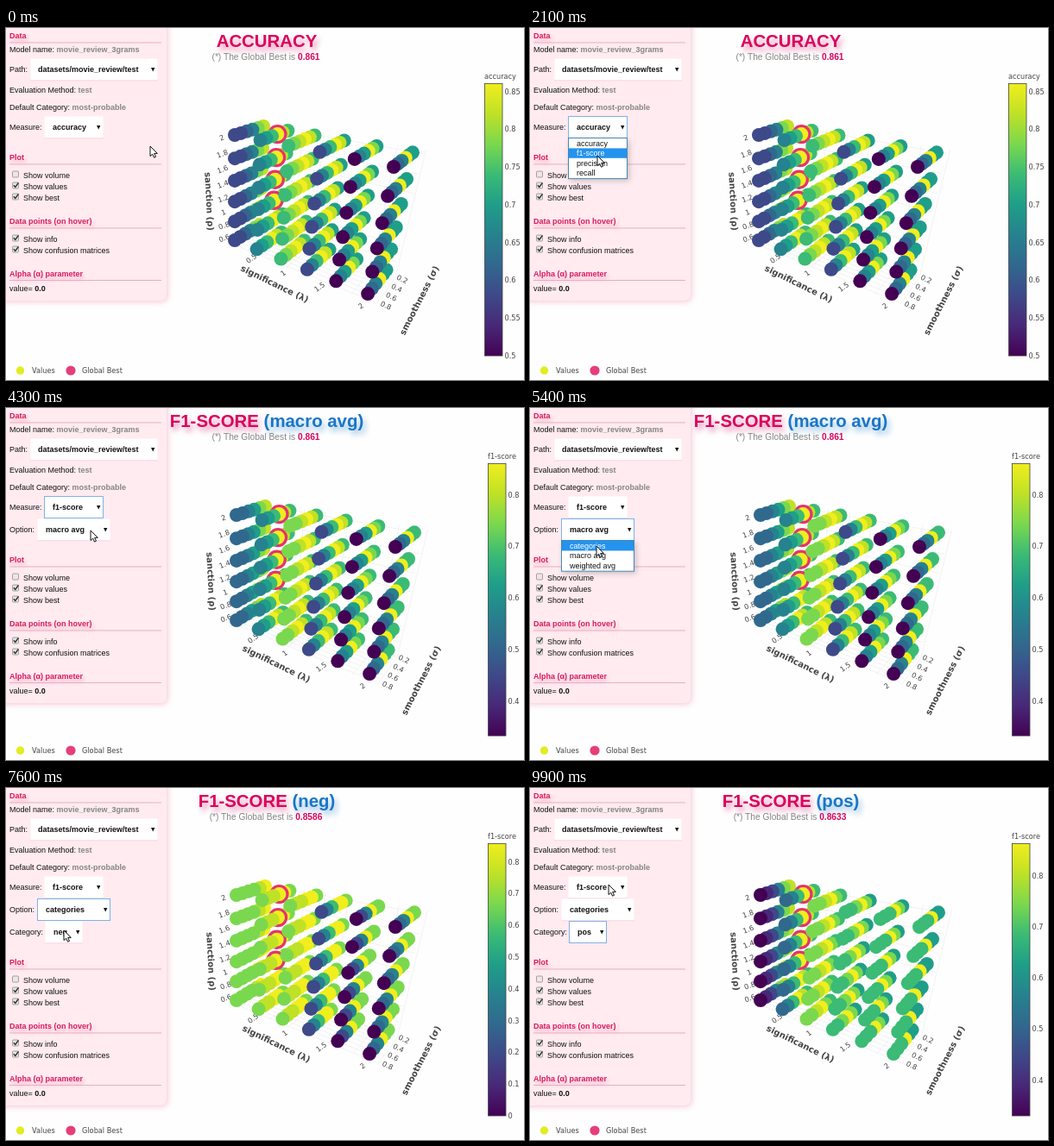
Recreate the animation shown at these times as an HTML page. Size 600x408 px, loop 10000 ms.

```html
<!DOCTYPE html>
<html lang="en">
<head>
<meta charset="utf-8">
<title>Model evaluation plot</title>
<style>
html, body { margin: 0; width: 100%; height: 100%; overflow: hidden; background: #fefefe; }
svg { display: block; }
text { font: 9px "Liberation Sans", Arial, sans-serif; fill: #111; white-space: pre; }
.b { font-weight: bold; }
.gray { fill: #858585; }
.mid { text-anchor: middle; }
.head { font-weight: bold; fill: #d81b60; filter: drop-shadow(2px 4px 2px #f48fb199); }
.title { font-size: 20.4px; font-weight: bold; text-anchor: middle; }
.pink { fill: #d9045c; }
.blue { fill: #1976c8; }
.sub { font-size: 10.2px; text-anchor: middle; }
.plot { font: 8.2px "DejaVu Sans", Verdana, sans-serif; fill: #444; }
.axis { font: bold 10px "DejaVu Sans", Verdana, sans-serif; fill: #444; text-anchor: middle; }
</style>
</head>
<body>
<svg id="stage" width="600" height="408" viewBox="0 0 600 408">
  <defs>
    <linearGradient id="ramp" x1="0" y1="1" x2="0" y2="0"></linearGradient>
    <filter id="soft" x="-20%" y="-60%" width="140%" height="220%"><feGaussianBlur stdDeviation="3"/></filter>
  </defs>
  <g id="plot"></g>
  <g id="panel"></g>
  <g id="heading"></g>
  <g id="menu"></g>
  <path id="cursor" d="M0 0V11.6L2.7 9.2L4.5 13.2L6.5 12.3L4.7 8.4H8.3Z" fill="#fff" stroke="#111" stroke-width="1" stroke-linejoin="round"/>
</svg>
<script>
const LOOP = 10000, STEP = 100;
const VIRIDIS = ['#440154', '#482878', '#3e4989', '#31688e', '#26828e', '#1f9e89', '#3bbb75', '#7ad84e', '#bfe126', '#f0ee1d'];

// Rows: significance; digits: colour level along smoothness, front to back.
const DATA = {
  accuracy: { name: 'accuracy', lo: .5, hi: .861, tick: .05, dx: 0, rows: '223478 456986 678986 246985 045975 034955' },
  macro: { name: 'f1-score', lo: .333, hi: .861, tick: .1, dx: 2, rows: '334578 456986 778986 246986 045976 034966' },
  neg: { name: 'f1-score', lo: 0, hi: .8586, tick: .1, dx: 2, rows: '777789 788997 788997 246997 024977 034977' },
  pos: { name: 'f1-score', lo: .33, hi: .8633, tick: .1, dx: 2, rows: '012478 346986 778976 667975 666975 666955' }
};
const VIEWS = {
  accuracy: { title: 'ACCURACY', best: '0.861', picks: ['accuracy'] },
  macro: { title: 'F1-SCORE', option: '(macro avg)', best: '0.861', picks: ['f1-score', 'macro avg'] },
  neg: { title: 'F1-SCORE', option: '(neg)', best: '0.8586', picks: ['f1-score', 'categories', 'neg'] },
  pos: { title: 'F1-SCORE', option: '(pos)', best: '0.8633', picks: ['f1-score', 'categories', 'pos'] }
};
const FIELDS = [
  { label: 'Measure:', x: 44, w: 69, y: 102, list: ['accuracy', 'f1-score', 'precision', 'recall'] },
  { label: 'Option:', x: 36, w: 85, y: 128, list: ['categories', 'macro avg', 'weighted avg'] },
  { label: 'Category:', x: 45, w: 44, y: 154, list: ['neg', 'pos'] }
];

// Steps: [start time, value]
const VIEW_STEPS = [[0, 'accuracy'], [2300, 'macro'], [5700, 'neg'], [8700, 'pos']];
const PLOT_STEPS = [[0, 'accuracy'], [2600, 'macro'], [6100, 'neg'], [9200, 'pos']];
const FOCUS_STEPS = [[0, -1], [1200, 0], [4600, 1], [7900, 2]];
const MENU_STEPS = [[0, -1], [1200, 0], [2300, -1], [4600, 1], [5700, -1], [7900, 2], [8700, -1]];
const CURSOR = [
  [0, 167, 137], [300, 165, 136], [900, 106, 117], [1300, 102, 117], [1800, 84, 140], [2100, 78, 148],
  [2400, 78, 148], [2800, 95, 132], [3200, 100, 138], [4400, 98, 142], [4800, 94, 143], [5300, 77, 160],
  [5800, 77, 160], [6400, 79, 165], [7600, 67, 165], [7900, 67, 166], [8600, 67, 196], [9100, 67, 196], [9900, 91, 112]
];

const $ = id => document.getElementById(id);
const rect = (x, y, w, h, fill, more = '') => `<rect x="${x}" y="${y}" width="${w}" height="${h}" fill="${fill}" ${more}/>`;
const circle = (x, y, r, fill, more = '') => `<circle cx="${x}" cy="${y}" r="${r}" fill="${fill}" ${more}/>`;
const text = (x, y, s, cls = '', more = '') => `<text x="${x}" y="${y}" class="${cls}" ${more}>${s}</text>`;
const span = (s, cls) => `<tspan class="${cls}">${s}</tspan>`;
const turned = (x, y, deg, s, cls) => text(0, 3, s, cls, `transform="translate(${x} ${y}) rotate(${deg})"`);
const stepAt = (steps, t) => steps.reduce((v, s) => t >= s[0] ? s[1] : v, steps[0][1]);

$('ramp').innerHTML = VIRIDIS.map((c, i) => `<stop offset="${i / 9}" stop-color="${c}"/>`).join('');

// Perspective view of the unit cube: u significance, v sanction (downwards), w smoothness (to the back).
function project(u, v, w) {
  const d = 1 - .233 * u + .149 * v + .093 * w;
  return { x: (265 + 79.4 * u + 39.5 * v + 60.7 * w) / d, y: (124 - .5 * u + 158.7 * v + .6 * w) / d, d };
}
const POINTS = [];
for (let i = 0; i < 6; i++)
  for (let j = 0; j < 6; j++)
    for (let k = 0; k < 6; k++)
      POINTS.push({ ...project(i / 5, j / 5, k / 5), i, k, best: i === 1 && j < 4 && k === 3 });
POINTS.sort((a, b) => b.d - a.d);

function line(a, b) {
  const p = project(...a), q = project(...b);
  return `M${p.x.toFixed(1)} ${p.y.toFixed(1)}L${q.x.toFixed(1)} ${q.y.toFixed(1)}`;
}
function grid() {
  let d = '';
  for (let n = 0; n < 8; n++) {
    const s = n / 7 * 1.06;
    d += line([-.03, s, 1.05], [1.05, s, 1.05]) + line([s, 1.05, -.05], [s, 1.05, 1.05]);
    d += line([s, -.03, 1.05], [s, 1.05, 1.05]) + line([-.03, 1.05, s], [1.05, 1.05, s]);
  }
  return `<path d="${d}" fill="none" stroke="#ececf0" stroke-width=".7"/>`;
}

function axes() {
  const rho = ['2', '1.8', '1.6', '1.4', '1.2', '1', '0.8', '0.6'];
  const rhoY = n => 127 + 19 * n - .34 * n * n;
  const lambda = [['0.5', 284, 267], ['1', 321, 284], ['1.5', 363, 300], ['2', 411, 322]];
  return rho.map((s, n) => turned(250 + n * .4, rhoY(n), -20, s, 'plot mid')).join('')
    + lambda.map(([s, x, y]) => turned(x, y, -35, s, 'plot mid')).join('')
    + [0, 1, 2, 3].map(n => turned(459 - 6.3 * n, 291 + 10.2 * n, 25, (.2 + .2 * n).toFixed(1), 'plot mid')).join('')
    + turned(235, 201, 87, 'sanction (ρ)', 'axis')
    + turned(311, 297, 26, 'significance (λ)', 'axis')
    + turned(479, 316, -63, 'smoothness (σ)', 'axis');
}

function colorbar({ name, lo, hi, tick, dx }) {
  const x = dx ? 558.5 : 554.5, digits = tick < .1 ? 2 : 1;
  let out = rect(x, 64.5, 20.5, 315.5, 'url(#ramp)', 'stroke="#444" stroke-width=".8"') + text(x - .5, 58.5, name, 'plot');
  for (let n = Math.ceil(lo / tick - 1e-6); n * tick < hi; n++) {
    const v = n * tick, y = 380 - (v - lo) / (hi - lo) * 316;
    out += text(x + 23, y + 3, n ? String(+v.toFixed(digits)) : '0', 'plot');
  }
  return out;
}

function drawPlot(key) {
  const set = DATA[key], rows = set.rows.split(' ');
  const dots = POINTS.map(p => {
    const x = p.x.toFixed(1), y = p.y.toFixed(1);
    return (p.best ? circle(x, y, 11.2, '#e4336f') : '') + circle(x, y, 8, VIRIDIS[rows[p.i][p.k]]);
  }).join('');
  return `<g transform="translate(${set.dx} 0)">${grid()}${axes()}${dots}</g>` + colorbar(set)
    + circle(16.5, 397, 4.7, '#e2ec22') + text(30, 400, 'Values', 'plot')
    + circle(75, 397, 5.6, '#e63e7b') + text(88, 400, 'Global Best', 'plot');
}

function section(y, s) {
  return text(4, y, s, 'head') + rect(4, y + 4.5, 176, .9, '#e3a9bf');
}
function select(x, y, w, s, focus) {
  const r = x + w;
  return rect(x + .5, y + .5, w - 1, 25, '#fff', focus ? 'stroke="#7fb2e8"' : '')
    + (focus ? '' : rect(x, y + 25.5, w, .8, '#f8cfdb'))
    + text(x + (x < 30 ? 9 : 10), y + 16, s, 'b')
    + `<path d="M${r - 8} ${y + 11}h4.4l-2.2 4.6z" fill="#111"/>`;
}
function check(y, s, on) {
  return rect(7.5, y - 7.5, 7, 7, on ? '#e4e4e4' : '#f1e4e8', 'rx="1" stroke="#999" stroke-width=".9"')
    + (on ? `<path d="M8.8 ${y - 4.3}l2 2.2 3.6-5" fill="none" stroke="#333" stroke-width="1.5"/>` : '')
    + text(20, y, s);
}
function info(y, label, value) {
  return text(4, y, label + ' ' + span(value, 'b gray'));
}

function drawPanel(key, focus) {
  const { picks } = VIEWS[key], dy = 26 * (picks.length - 1);
  let out = rect(-10, -10, 198, 328 + dy, '#f3a8bf', 'rx="8" opacity=".55" filter="url(#soft)"')
    + rect(-8, -8, 194, 324 + dy, '#ffebf0', 'rx="7"')
    + section(12, 'Data')
    + info(28, 'Model name:', 'movie_review_3grams')
    + text(4, 51, 'Path:') + select(28, 35, 148, 'datasets/movie_review/test')
    + info(74.5, 'Evaluation Method:', 'test')
    + info(95, 'Default Category:', 'most-probable');
  picks.forEach((s, n) => {
    const f = FIELDS[n];
    out += text(4, f.y + 16, f.label) + select(f.x, f.y, f.w, s, n === focus);
  });
  return out + `<g transform="translate(0 ${dy})">`
    + section(153, 'Plot')
    + check(173.5, 'Show volume') + check(186.5, 'Show values', true) + check(199.5, 'Show best', true)
    + section(227, 'Data points (on hover)')
    + check(247.5, 'Show info', true) + check(260.5, 'Show confusion matrices', true)
    + section(287.5, 'Alpha (α) parameter')
    + text(4, 305, 'value= ' + span('0.0', 'b')) + '</g>';
}

function drawHeading(key) {
  const { title, option, best } = VIEWS[key];
  const words = span(title, 'pink') + (option ? ' ' + span(option, 'blue') : '');
  return text(305, 27, words, 'title', 'filter="url(#soft)" opacity=".45" aria-hidden="true"')
    + text(302, 22.3, words, 'title')
    + text(301, 36.8, span('(*) The Global Best is ', 'gray') + span(best, 'b pink'), 'sub');
}

function drawMenu(n, hover) {
  if (n < 0) return '';
  const { x, y, w, list } = FIELDS[n], top = y + 26, row = 11.4, h = row * list.length + 1.5;
  return rect(x + 2, top + 2, w, h, '#555', 'opacity=".3" filter="url(#soft)"')
    + rect(x + .5, top - .5, w - 1, h, '#fff', 'stroke="#4587b5"')
    + list.map((s, i) => (i === hover ? rect(x + 1, top + i * row, w - 2, row, '#2493ee') : '')
      + text(x + 10, top + i * row + 9, s, '', i === hover ? 'style="fill:#fff"' : '')).join('');
}

function cursorAt(t) {
  const n = CURSOR.findIndex(p => p[0] >= t);
  if (n < 1) return CURSOR[n < 0 ? CURSOR.length - 1 : 0].slice(1);
  const [a, b] = [CURSOR[n - 1], CURSOR[n]], p = (t - a[0]) / (b[0] - a[0]), e = p * p * (3 - 2 * p);
  return [a[1] + (b[1] - a[1]) * e, a[2] + (b[2] - a[2]) * e];
}

const shown = {};
function put(id, draw, ...args) {
  const key = args.join();
  if (shown[id] === key) return;
  shown[id] = key;
  $(id).innerHTML = draw(...args);
}

function render(time) {
  const t = Math.floor(time % LOOP / STEP) * STEP;
  const view = stepAt(VIEW_STEPS, t), menu = stepAt(MENU_STEPS, t), [x, y] = cursorAt(t);
  let hover = -1;
  if (menu >= 0) {
    const f = FIELDS[menu];
    hover = Math.floor((y - f.y - 26) / 11.4);
    if (hover < 0) hover = f.list.indexOf(VIEWS[view].picks[menu]);
    hover = Math.min(hover, f.list.length - 1);
  }
  put('plot', drawPlot, stepAt(PLOT_STEPS, t));
  put('panel', drawPanel, view, stepAt(FOCUS_STEPS, t));
  put('heading', drawHeading, view);
  put('menu', drawMenu, menu, hover);
  $('cursor').setAttribute('transform', `translate(${x.toFixed(1)} ${y.toFixed(1)})`);
}

const start = performance.now();
function tick() {
  render(performance.now() - start);
  requestAnimationFrame(tick);
}
tick();
</script>
</body>
</html>
```
